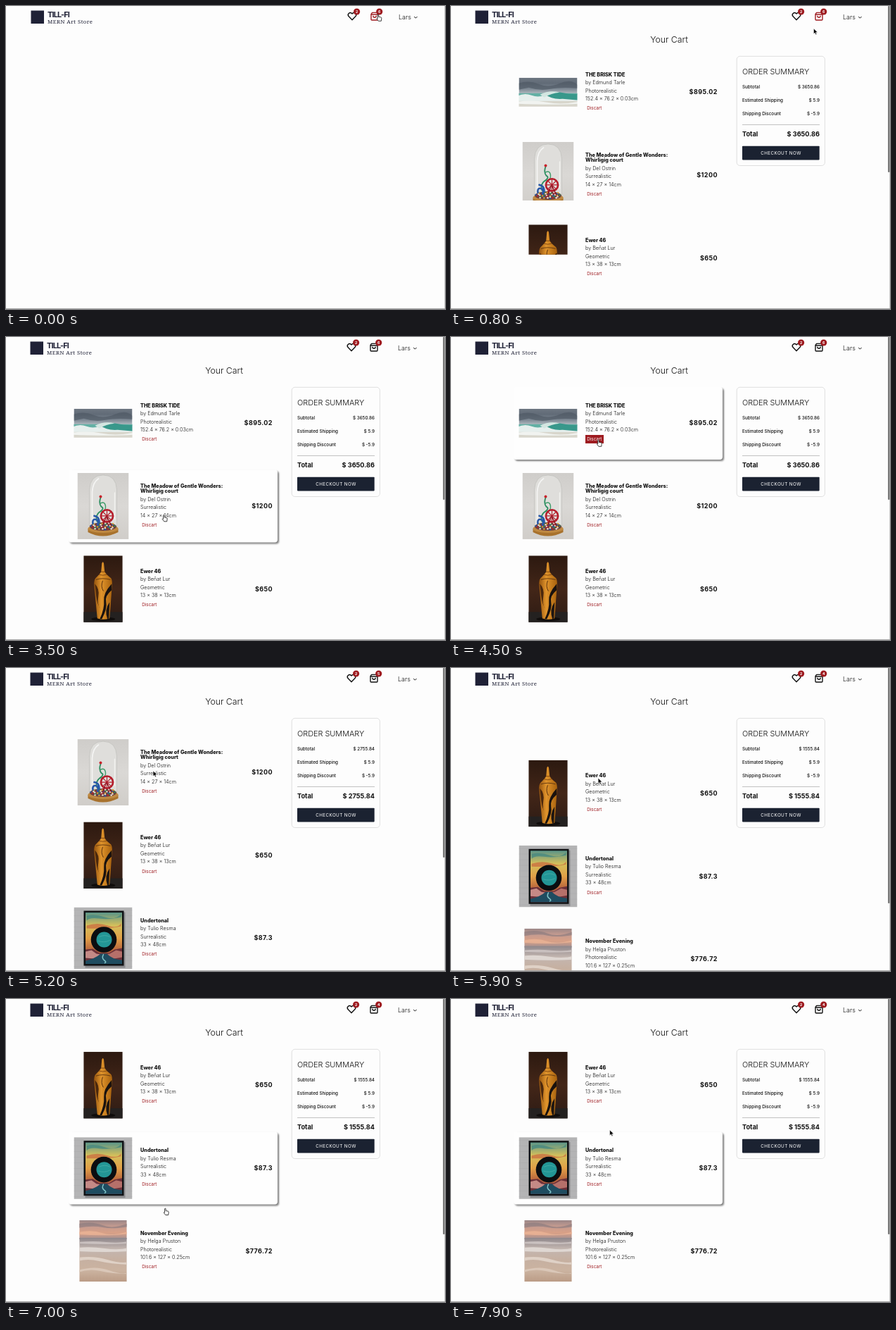
These frames come from a looping animation (624x430 px, 8 s). An HTML page:

```html
<!DOCTYPE html>
<html lang="en">
<head>
<meta charset="utf-8">
<title>Cart</title>
<style>
html, body { margin: 0; width: 100%; height: 100%; overflow: hidden; background: #fdfdfd; }
svg { display: block; }
text { font-family: Inter, "Liberation Sans", sans-serif; fill: #111; white-space: pre; }
.brand { font-size: 11px; font-weight: 700; letter-spacing: -.85px; fill: #1f2136; }
.tag { font: 7.8px "Noto Serif", serif; letter-spacing: .42px; fill: #1f2136; }
.user { font-size: 9px; font-weight: 300; }
.badge { font-size: 5.2px; font-weight: 700; fill: #fff; text-anchor: middle; }
.head { font-size: 12.3px; font-weight: 300; text-anchor: middle; }
.sum { font-size: 10.9px; font-weight: 300; }
.row { font-size: 6.3px; font-weight: 450; }
.total { font-size: 9.2px; font-weight: 700; }
.cta { font-size: 6.3px; letter-spacing: .4px; fill: #fff; text-anchor: middle; }
.name { font-size: 7.25px; font-weight: 800; }
.info { font-size: 7.2px; font-weight: 300; }
.drop { font-size: 6.3px; }
.price { font-size: 9px; font-weight: 700; letter-spacing: .4px; text-anchor: end; }
.end { text-anchor: end; }
.card { fill: #fefefe; filter: drop-shadow(2px 2px 1.3px rgba(0,0,0,.5)); }
.line { fill: none; stroke-width: 1.4; stroke-linejoin: round; stroke-linecap: round; }
.soft { filter: blur(.7px); }
</style>
</head>
<body>
<svg id="stage" width="624" height="430" viewBox="0 0 624 430"></svg>
<script>
const LOOP = 8000, PITCH = 117.6;
const RED = [158, 27, 32], INK = [17, 17, 17], WHITE = [255, 255, 255];

const text = (x, y, str, cls, id = '') => `<text x="${x}" y="${y}" class="${cls}" id="${id}">${str}</text>`;
const rect = (x, y, w, h, fill, more = '') =>
  `<rect x="${x}" y="${y}" width="${w}" height="${h}" fill="${fill}" ${more}/>`;
const path = (d, fill, more = '') => `<path d="${d}" fill="${fill}" ${more}/>`;
const stroke = (d, color, w) => path(d, 'none', `stroke="${color}" stroke-width="${w}" stroke-linecap="round"`);
const disc = (x, y, r, fill, more = '') => `<circle cx="${x}" cy="${y}" r="${r}" fill="${fill}" ${more}/>`;
const oval = (x, y, rx, ry, fill) => `<ellipse cx="${x}" cy="${y}" rx="${rx}" ry="${ry}" fill="${fill}"/>`;
const soft = inner => `<g class="soft">${inner}</g>`;
const fade = (id, ...colors) =>
  `<linearGradient id="${id}" x2="0" y2="1">${colors.map((c, i) =>
    `<stop offset="${i / (colors.length - 1)}" stop-color="${c}"/>`).join('')}</linearGradient>`;

const seaArt = () => fade('storm', '#6d7681', '#616b77', '#7f8a95', '#bcc4c9') +
  rect(0, 0, 83, 24, 'url(#storm)') + soft(
    path('M0 8Q14 3 28 9T58 8T83 10V15Q60 13 45 16T14 14L0 17Z', '#505a66', 'opacity=".7"') +
    rect(-2, 22, 87, 13, '#62b0a4') +
    path('M34 26Q46 18 60 21T85 23V33H40Z', '#38988b') +
    path('M-2 26Q8 21 18 25T38 24Q46 31 62 30L85 32V36H-2Z', '#e6efed') +
    path('M30 24Q44 17 58 21Q46 22 36 28Z', '#d3e6e1') +
    rect(-2, 33, 87, 10, '#d8d6cc') + path('M-2 34Q20 31 40 35T85 34V37Q50 39 -2 37Z', '#f1f3f0'));

const domeArt = () => {
  const beads = ['#b3202b', '#efe9df', '#2b5aa6', '#d9a52f', '#2d8b55', '#e6dcd0'];
  let s = fade('wall', '#cfcdca', '#dad8d5', '#d0cdc9') + rect(0, 0, 73, 94, 'url(#wall)') +
    path('M17 80V24Q18 3 36.5 3T56 24V80Z', '#dfdedb', 'stroke="#bdbdb9" stroke-width=".7"') +
    soft(stroke('M21 70V27Q22 13 30 8', '#f4f4f3', 1.8) + stroke('M53 66V28', '#f2f2f0', 1.4)) +
    path('M15 79V84Q36 95 58 84V79Z', '#a8722d') + oval(36.5, 79, 21.5, 6, '#c08a42') +
    oval(36.5, 76, 19, 6, '#6d4140');
  for (let i = 0; i < 40; i++) {
    const a = i * 2.4, r = Math.sqrt(i / 40);
    s += disc(36.5 + 18 * r * Math.cos(a), 75.5 + 5.5 * r * Math.sin(a), 1.2, beads[i % 6]);
  }
  s += stroke('M28 69Q25 60 32 55T34 48Q30 43 33 35', '#2c8d60', 1.8) +
    stroke('M33 55Q41 54 40 47T33 43', '#3c9b68', 1.4) + disc(33, 33.5, 2, '#c9252d') +
    stroke('M22 72Q21 65 26 66T29 74M24 61Q31 62 31 70', '#2858a8', 2.6) +
    disc(42, 61, 8.6, 'none', 'stroke="#b51d2b" stroke-width="2.6"');
  for (let k = 0; k < 4; k++) {
    const dx = 8 * Math.cos(k * Math.PI / 4), dy = 8 * Math.sin(k * Math.PI / 4);
    s += stroke(`M${42 - dx} ${61 - dy}L${42 + dx} ${61 + dy}`, '#b51d2b', 1.1);
  }
  return s + stroke('M41 62L36 75M42 62L48 75', '#8f1824', 1.4);
};

const ewerArt = () => fade('dark', '#2c1910', '#432618', '#2d1b14') +
  '<linearGradient id="glaze"><stop stop-color="#96550f"/><stop offset=".4" stop-color="#e0942c"/><stop offset="1" stop-color="#a8620e"/></linearGradient>' +
  rect(0, 0, 55.5, 94.5, 'url(#dark)') + rect(0, 80, 55.5, 15, '#242120') +
  soft(oval(28, 90, 17, 3, '#100d0c')) +
  path('M26 11Q27.400 7 28.800 11L30 23L33 27 39 32Q41 35 40.500 42L37 89Q28 92 19.500 89L15 42Q14.500 35 17 32L22 27 25 23Z', 'url(#glaze)') +
  stroke('M25 23H30M22 27Q27 29 33 27', '#7d430f', .9) +
  stroke('M18 34Q27 31 38 34', '#5d3410', .9) +
  path('M40 40Q28 53 29 64T23 90H26Q34 75 32 66T40 49Z', '#1a120e') +
  path('M34 90Q29 77 37 66L36 89Z', '#1d1511') +
  path('M16 40Q23 47 21 58T24 76Q19 68 18 58Z', '#4b280d') +
  stroke('M27 36Q24 44 28 50', '#5a300e', 1);

const orbArt = () => fade('dusk', '#5b9588', '#d3bf5b', '#e2a047', '#b4603c', '#5e3236') +
  rect(0, 0, 83, 88, '#b4b4b5') +
  Array.from({ length: 11 }, (_, i) => rect(0, 4 + i * 8, 83, .5, '#a9a9ab')).join('') +
  soft(rect(16, 7, 57, 79, '#8b8b8e')) + rect(14, 5, 57, 78, '#101214') + rect(16.5, 7.5, 52, 73, 'url(#dusk)') +
  soft(path('M18 12Q30 9 44 14T67 10V14Q50 18 36 16T18 19Z', '#3f8582', 'opacity=".7"') +
    path('M18 26Q34 21 48 26T67 23V27Q50 31 18 30Z', '#c8573a', 'opacity=".6"')) +
  disc(42.5, 46, 18.3, '#0b0d10') + disc(43, 46, 11, '#239696') +
  stroke('M36 42Q44 38 51 42M35 48Q43 51 51 47', '#4aaea8', .8) +
  path('M16.500 80.500V60L27 59 36 65H50L58 60 68.500 58V80.500Z', '#6c3139') +
  path('M16.500 63L25 61 32 66 38 67 30 73 16.500 72Z', '#c58a86') +
  path('M68.500 63L60 61 51 66 46 67 57 73 68.500 71Z', '#b5706a') +
  path('M16.500 80.500V76Q30 73 38 66H47Q54 74 68.500 75V80.500Z', '#1f4c60') +
  stroke('M42 67Q39 72 43 75T44 79', '#7fc4c8', 1.5);

const beachArt = () => fade('eve', '#9a8687', '#c69c90', '#d9a086', '#a08f92') +
  fade('shore', '#8f878b', '#c3b6b0', '#c6b0a1', '#cbb3a0', '#bb9c86') +
  rect(0, 0, 67.5, 27, 'url(#eve)') + rect(0, 25, 67.5, 62, 'url(#shore)') + soft(
    path('M-2 5Q18 1 33 7T70 4V9Q47 13 33 10T-2 11Z', '#86787d', 'opacity=".6"') +
    path('M-2 17Q18 13 32 18T70 16V19Q40 23 -2 20Z', '#ecb596', 'opacity=".8"') +
    path('M-2 31Q20 29 38 31T70 30V33Q40 35 -2 33Z', '#c9c0bf') +
    path('M-2 39Q16 37 36 40T70 39V44Q40 46 -2 44Z', '#dfd7d2') +
    path('M-2 53Q20 50 40 56T70 59V63Q44 62 28 58T-2 58Z', '#dfd1c6') +
    path('M-2 71Q22 64 42 71T70 74V76Q46 76 30 72T-2 74Z', '#dac7b8'));

const items = [
  { name: ['THE BRISK TIDE'], by: 'Edmund Tarle', kind: 'Photorealistic', size: '152.4 × 76.2 × 0.03cm', price: '$895.02', art: seaArt, w: 83, h: 41 },
  { name: ['The Meadow of Gentle Wonders:', 'Whirligig court'], by: 'Del Ostrin', kind: 'Surrealistic', size: '14 × 27 × 14cm', price: '$1200', art: domeArt, w: 73, h: 94 },
  { name: ['Ewer 46'], by: 'Beñat Lur', kind: 'Geometric', size: '13 × 38 × 13cm', price: '$650', art: ewerArt, w: 55.5, h: 94.5 },
  { name: ['Undertonal'], by: 'Tulio Resma', kind: 'Surrealistic', size: '33 × 48cm', price: '$87.3', art: orbArt, w: 83, h: 87.5 },
  { name: ['November Evening'], by: 'Helga Pruston', kind: 'Photorealistic', size: '101.6 × 127 × 0.25cm', price: '$776.72', art: beachArt, w: 67.5, h: 87 }
];

const itemMarkup = it => {
  const two = it.name.length > 1, top = two ? 96 : 99.6, d = two ? 3.9 : 0;
  return `<g class="item"><rect class="card" x="89" y="71" width="297" height="103" rx="4"/>
  <svg class="art" x="${138 - it.w / 2}" y="${122.3 - it.h / 2}" width="${it.w}" height="${it.h}">${it.art()}</svg>` +
    it.name.map((n, i) => text(191, top + i * 7.5, n, 'name')).join('') +
    text(191, 111.1 + d, 'by ' + it.by, 'info') + text(191, 122.6 + d, it.kind, 'info') +
    text(191, 134.1 + d, it.size, 'info') +
    rect(191, 139 + d, 26, 12, `rgb(${RED})`, 'class="btn"') + text(193.3, 147.3 + d, 'Discart', 'drop') +
    text(378.9, 125.4, it.price, 'price') + '</g>';
};

const row = (y, label, value, id) => text(414, y, label, 'row') + text(524, y, value, 'row end', id);

const stage = document.getElementById('stage');
stage.innerHTML = rect(0, 0, 624, 430, '#fdfdfd') +
  `<g id="page">${items.map(itemMarkup).join('')}` +
  text(310, 52.4, 'Your Cart', 'head') +
  rect(406.2, 71.3, 125.2, 155.2, '#fdfdfd', 'rx="4.5" stroke="#dcdcdc" stroke-width=".9"') +
  text(414, 97.3, 'ORDER SUMMARY', 'sum') +
  row(117, 'Subtotal', '', 'sub') + row(136, 'Estimated Shipping', '$ 5.9') + row(155, 'Shipping Discount', '$ -5.9') +
  rect(414, 168, 110, .8, '#b5b5b5') +
  text(414, 185.1, 'Total', 'total') + text(524, 185.1, '', 'total end', 'sum') +
  rect(414, 198.8, 109.7, 19.6, '#1b2231', 'rx=".8"') + text(469, 211, 'CHECKOUT NOW', 'cta') + '</g>' +
  '<g id="header">' + rect(34.5, 6.5, 18.5, 18.5, '#1f2136') +
  text(58, 15.6, 'TILL-FI', 'brand') + text(58, 25, 'MERN Art Store', 'tag') +
  path('M491 19.700L486.200 14.800A3 3 0 0 1 490.500 10.600L491 11.100 491.500 10.600A3 3 0 0 1 495.800 14.800Z', 'none', 'class="line" stroke="#111"') +
  path('M518 11.600L519.600 9.400H526.400L528 11.600V19A1 1 0 0 1 527 20H519A1 1 0 0 1 518 19ZM518 12H528M520.900 14.200A2.100 2.100 0 0 0 525.100 14.200', 'none', 'class="line" id="bag"') +
  disc(497.6, 8, 4.6, `rgb(${RED})`) + text(497.6, 9.9, '2', 'badge') +
  disc(529.7, 8, 4.6, `rgb(${RED})`) + text(529.7, 9.9, '', 'badge', 'count') +
  text(557, 18.8, 'Lars', 'user') +
  path('M579.500 15.300L581.400 17.200 583.300 15.300', 'none', 'class="line" stroke="#111" style="stroke-width:1"') + '</g>' +
  rect(623, 0, 1, 430, '#d2d2d2') + rect(621.2, 0, 2.2, 0, '#6c6c6c', 'id="thumb" rx="1"') +
  rect(0, 429, 624, 1, '#a6a6a6') +
  '<g id="cursor">' +
  path('M0 0V7.600L1.800 6 3 8.700 4.300 8.100 3.100 5.500H5.600Z', '#000', 'id="arrow" stroke="#fff" stroke-width=".5"') +
  path('M-.8 .8A.8 .8 0 0 1 .8 .8V3.400L3.800 3.900Q5 4.200 4.800 5.500L4.300 9.300H.4L-2.200 5.900Q-1.800 4.900 -.8 5.700Z', '#fff', 'id="hand" stroke="#111" stroke-width=".8"') + '</g>';

const $ = id => document.getElementById(id);
const parts = [...stage.querySelectorAll('.item')].map(g => ({
  g, card: g.querySelector('.card'), art: g.querySelector('.art'), btn: g.querySelector('.btn'), drop: g.querySelector('.drop')
}));

const ramp = (t, a, b) => Math.min(1, Math.max(0, (t - a) / (b - a)));
const mix = (a, b, p) => `rgb(${a.map((v, i) => Math.round(v + (b[i] - v) * p))})`;
const slide = (t, start) => 1 - (1 - ramp(t, start, start + 660)) ** 2;
const at = (table, t) => table.filter(r => r[0] <= t).pop()[1];

// item, from, to
const hovers = [[1, 1520, 4150], [0, 4200, LOOP], [1, 5380, LOOP], [2, 6000, 6600],
  [3, 6650, 7040], [4, 7100, 7540], [3, 7580, LOOP]];
const presses = [[0, 4330, LOOP], [1, 5380, LOOP]];
const level = (list, i, t) => Math.max(0, ...list.filter(h => h[0] === i)
  .map(([, a, b]) => ramp(t, a, a + 150) * (1 - ramp(t, b, b + 150))));

const CUT1 = 4850, CUT2 = 5695;
const exits = { 0: CUT1, 1: CUT2 };
const reveals = { 0: [300, 600], 1: [350, 860], 2: [450, 1232] };
const totals = [[0, '3650.86'], [CUT1, '2755.84'], [CUT2, '1555.84']];
const counts = [[0, 6], [CUT1, 5], [CUT2, 4]];
const thumbs = [[0, 0], [100, 236], [1000, 231], [CUT1, 269], [CUT2, 334]];
const pointers = [[0, 'hand'], [400, 'arrow'], [1600, 'hand'], [4950, 'arrow'], [5380, 'hand'],
  [5700, 'arrow'], [6000, 'hand'], [7850, 'arrow']];
const track = [[0, 529, 12], [200, 529, 12], [800, 515.5, 32], [1000, 514, 34], [1800, 340, 205],
  [2200, 219.5, 260], [3400, 219.5, 260], [3550, 226, 250], [3700, 215, 238], [3950, 215, 238],
  [4400, 209.5, 146], [5700, 209, 146], [6200, 209.5, 175], [6450, 211, 181], [7250, 231, 332],
  [7400, 232, 335], [7900, 225.7, 186], [LOOP, 225.5, 183]];

function place(t) {
  const i = Math.max(1, track.findIndex(k => k[0] > t));
  const [a, x, y] = track[i - 1], [b, u, v] = track[i];
  const p = ramp(t, a, b), e = p * p * (3 - 2 * p);
  return [x + (u - x) * e, y + (v - y) * e];
}

function draw(t) {
  const s1 = slide(t, CUT1), s2 = slide(t, CUT2);
  $('page').setAttribute('opacity', ramp(t, 100, 500));
  $('header').setAttribute('transform', `translate(${t < 100 ? 1 : 0} 0)`);
  parts.forEach((p, i) => {
    const slot = i - (i > 0 ? s1 : 0) - (i > 1 ? s2 : 0);
    const press = level(presses, i, t);
    const gone = i in exits ? ramp(t, exits[i] - 150, exits[i]) : 0;
    p.g.setAttribute('transform', `translate(0 ${slot * PITCH})`);
    p.g.setAttribute('opacity', 1 - gone);
    p.card.setAttribute('opacity', level(hovers, i, t));
    p.btn.setAttribute('opacity', press);
    p.drop.style.fill = mix(RED, WHITE, press);
    p.art.setAttribute('height', items[i].h * (i in reveals ? ramp(t, ...reveals[i]) : 1));
  });
  $('bag').style.stroke = mix(RED, INK, ramp(t, 1050, 1350));
  $('count').textContent = at(counts, t);
  $('sub').textContent = $('sum').textContent = '$ ' + at(totals, t);
  $('thumb').setAttribute('height', at(thumbs, t));
  const kind = at(pointers, t);
  for (const id of ['arrow', 'hand']) $(id).style.display = id === kind ? '' : 'none';
  $('cursor').setAttribute('transform', `translate(${place(t)})`);
}

const begin = performance.now();
function tick() {
  draw((performance.now() - begin) % LOOP);
  requestAnimationFrame(tick);
}
tick();
</script>
</body>
</html>
```
